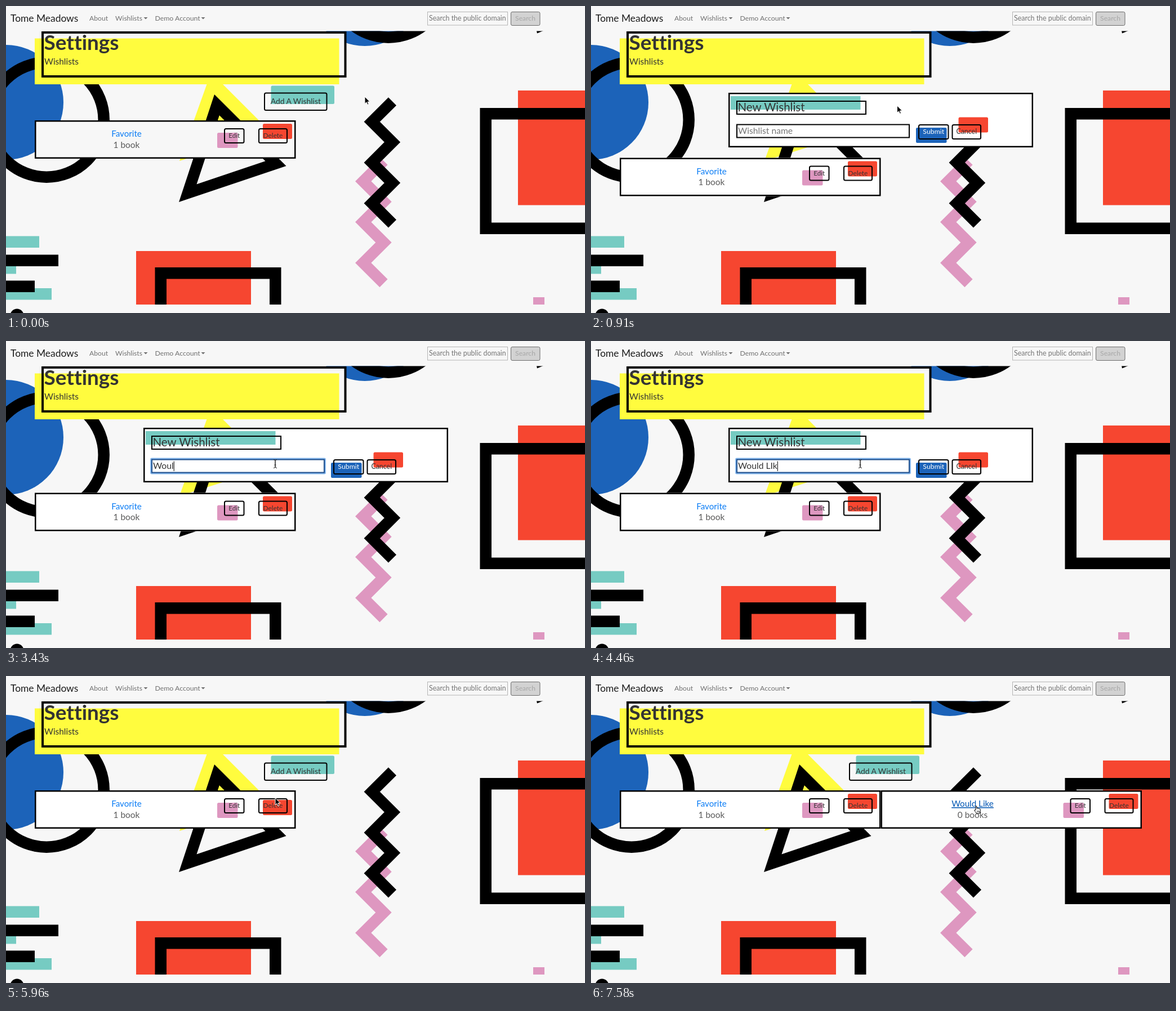
An HTML page that plays this animation: 1028x545 px, repeating every 8000 ms.

```html
<!DOCTYPE html>
<html lang="en">
<head>
<meta charset="utf-8">
<title>Wishlist settings</title>
<style>
  html, body { margin: 0; width: 100%; height: 100%; overflow: hidden; background: #f7f7f7; }
  svg { display: block; width: 100vw; height: 100vh; }
  text { font-family: Lato, "Open Sans", sans-serif; font-variant-ligatures: none; white-space: pre; }
</style>
</head>
<body>
<svg id="stage" viewBox="0 0 1028 545"></svg>
<script>
const LOOP = 8000;
const BG = '#f7f7f7', BLUE = '#1c63b9', YELLOW = '#fffc3e', TEAL = '#76cbc2',
      RED = '#f64630', PINK = '#de97c0', INK = '#333';

// Boxes are given by their outer edges: left, top, right, bottom.
const box = (l, t, r, b, fill, more = '') =>
  `<rect x="${l}" y="${t}" width="${r - l}" height="${b - t}" fill="${fill}" ${more}/>`;
const frame = (l, t, r, b, w, fill = 'none', more = '') =>
  box(l + w / 2, t + w / 2, r - w / 2, b - w / 2, fill, `stroke="#000" stroke-width="${w}" ${more}`);
const label = (str, x, y, size, fill = INK, more = '') =>
  `<text x="${x}" y="${y}" font-size="${size}" fill="${fill}" ${more}>${str}</text>`;
const mid = (str, x, y, size, fill = INK, more = '') =>
  label(str, x, y, size, fill, `text-anchor="middle" ${more}`);
const group = (id, body, more = '') => `<g id="${id}" ${more}>${body}</g>`;

// Outlined button with a flat block shifted behind it.
const button = (str, l, t, r, b, dx, dy, color, size, ink = INK, id = '') =>
  box(l + dx, t + dy, r + dx, b + dy, color, `rx="2.5" ${id && `id="${id}"`}`) +
  frame(l, t, r, b, 2, 'none', 'rx="2.5"') +
  mid(str, (l + r) / 2, (t + b) / 2 + 3.8, size, ink);

const zigzag = (x, y, color) => {
  const pts = Array.from({ length: 7 }, (_, i) => [x - (i % 2) * 36.3, y + i * 36.2]);
  return `<polyline points="${pts.join(' ')}" fill="none" stroke="${color}" stroke-width="20" stroke-miterlimit="9"/>`;
};

const card = (x, name, count, key) =>
  box(x, 203, x + 463.5, 271, '#fff', 'class="paper"') +
  button('Edit', x + 336, 217, x + 372.5, 244, -12, 8, PINK, 11.6) +
  button('Delete', x + 397, 217, x + 449, 244, 8, -8, RED, 11.9, INK, 'block' + key) +
  frame(x, 203, x + 463.5, 271, 2.5) +
  mid(name, x + 163, 232, 15.2, '#0a7cf5', `id="name${key}"`) +
  mid(count, x + 163, 251.5, 15.4, '#5a5a5a');

const scenery = `
  <clipPath id="tri"><path d="M370 157L307 348L497.5 284Z"/></clipPath>
  <clipPath id="page"><rect y="44.5" width="1028" height="485.5"/></clipPath>
  <g clip-path="url(#page)">
    <circle cx="0" cy="171" r="102" fill="${BLUE}"/>
    <circle cx="72" cy="202" r="101.7" fill="none" stroke="#000" stroke-width="20.5"/>
    <circle cx="637" cy="-31" r="102" fill="${BLUE}"/>
    <circle cx="679" cy="-46" r="101.7" fill="none" stroke="#000" stroke-width="20.5"/>
    <path d="M942 44L954 44L943 48.5Z"/>
    <path d="M364 118L308 275L470 224Z" fill="${YELLOW}"/>
    <path d="M370 157L307 348L497.5 284Z" fill="none" stroke="#000" stroke-width="40" clip-path="url(#tri)"/>
    ${zigzag(670.5, 275, PINK)}${zigzag(686, 169.3, '#000')}
    ${box(909, 150, 1113, 353.5, RED)}${frame(841.5, 181, 1065, 405, 20.5)}
    ${box(231, 435, 435, 640, RED)}${frame(264.5, 464, 488.5, 688, 20.5)}
    ${box(0, 408.5, 59, 429, TEAL)}${box(0, 455, 18, 475.5, TEAL)}${box(0, 501, 81, 521.5, TEAL)}
    ${box(0, 441.5, 93, 462, '#000')}${box(0, 487.5, 51, 508, '#000')}
    ${box(936, 517, 956, 540, PINK)}
  </g>
  <circle cx="19.5" cy="549.5" r="12"/>`;

const nav = label('Tome Meadows', 8, 27.5, 17.4, '#1c1c1c') +
  label('About', 148, 26, 12.2, '#707070') +
  label('Wishlists', 194, 26, 12.1, '#707070') +
  label('Demo Account', 264.5, 26, 12.3, '#707070') +
  '<path d="M244.5 20h7l-3.5 3.5zM346.5 20h7l-3.5 3.5z" fill="#707070"/>' +
  box(748.5, 10.5, 890.5, 34, BG, 'stroke="#b5b5b5"') +
  label('Search the public domain', 751, 26, 12.4, '#757575') +
  box(896.5, 10.5, 948, 34.5, '#d2d2d2', 'stroke="#6d6d6d" rx="2.5"') +
  mid('Search', 922, 26, 12.2, '#a6a6a6');

const header = box(64, 46, 604, 126, BG) + box(51, 57.5, 591.5, 139, YELLOW) +
  frame(63, 45, 604.5, 127, 4) +
  label('Settings', 67.5, 78, 36.9, INK, 'font-weight="700"') +
  label('Wishlists', 68, 104, 15.4);

const add = group('addIdle', button('Add A Wishlist', 458, 153.5, 570.5, 186, 12.5, -12, TEAL, 13.9)) +
  group('addHover',
    box(454, 149, 565, 180, YELLOW, 'opacity=".5" rx="2" style="filter:blur(1.5px)"') +
    box(459, 154.5, 569.5, 185, '#89a9d8', 'rx="2"') + box(459, 154.5, 564, 180, BLUE) +
    frame(458, 153.5, 570.5, 186, 2, 'none', 'rx="2.5"') +
    mid('Add A Wishlist', 514.25, 173.6, 13.9, '#fff'));

const form = frame(244, 154, 785, 251, 2.5, '#fff') +
  box(248, 160, 478.5, 184, TEAL) + frame(258, 168, 489, 193, 2) +
  label('New Wishlist', 260.5, 187, 20.5) +
  group('ring', box(257.5, 209, 566.5, 235, 'none', 'stroke="#86b7ec" stroke-width="3" rx="1.5"')) +
  box(259, 210.5, 565, 233.5, '#fff', 'id="field" stroke="#000" stroke-width="2"') +
  label('Wishlist name', 261, 227, 15.7, '#757575', 'id="hint"') +
  label('', 261, 227, 15.7, INK, 'id="typed"') +
  box(261, 213.5, 262, 231, '#000', 'id="caret"') +
  button('Submit', 581, 210, 635.5, 237, -4, 6, BLUE, 12.3, '#fff') +
  button('Cancel', 640.5, 210, 693, 237, 12, -12.5, RED, 12.4);

const cursors = group('arrow', '<path d="M0 0V12.5L3 9.8L5 14.3L7 13.4L5.1 9H9Z" stroke="#fff"/>') +
  group('beam', '<path d="M-3 -7.5Q0 -7.5 0 -5V5Q0 7.5 -3 7.5M3 -7.5Q0 -7.5 0 -5V5Q0 7.5 3 7.5M-1.5 2H1.5" fill="none" stroke="#222"/>') +
  group('hand', '<path d="M3 8V1.5Q4 0 5 1.5V5Q6.5 4 7.3 5.5Q8.8 4.7 9.5 6Q11.5 5.5 11.5 7.5Q11.5 10 10 14H4.5Q3.5 12 .8 9Q.5 6.8 3 8Z" fill="#fff" stroke="#000"/><path d="M5.8 9v3M7.6 9v3M9.3 9v3" stroke="#000" stroke-width=".7"/>');

document.getElementById('stage').innerHTML = scenery + nav + header + group('add', add) +
  group('list', card(51, 'Favorite', '1 book', 'A') + group('second', card(514.5, 'Would Like', '0 books', 'B'))) +
  group('form', form) + cursors;

const ui = {};
document.querySelectorAll('#stage [id]').forEach(e => ui[e.id] = e);
const papers = document.querySelectorAll('.paper');

// Step tables: start time, then the values held until the next row.
const pointer = [
  [0, 'arrow', 637, 161], [290, 'arrow', 631, 163], [450, 'arrow', 604, 169],
  [610, 'arrow', 573, 174], [760, 'arrow', 543.5, 177], [1060, 'arrow', 532, 190],
  [1210, 'beam', 494, 219], [1350, 'beam', 478, 218], [5810, 'arrow', 478, 216.5],
  [6250, 'arrow', 482, 228], [6400, 'arrow', 498, 252], [6550, 'arrow', 527, 282],
  [6690, 'arrow', 553, 306], [6840, 'arrow', 566, 314], [7140, 'arrow', 590, 304],
  [7290, 'arrow', 632, 276], [7430, 'arrow', 668, 247], [7580, 'hand', 680, 230]
];
const typing = [
  [0, ''], [2990, 'W'], [3140, 'Wo'], [3280, 'Wou'], [3430, 'Woul'], [3570, 'Would'],
  [3720, 'Would L'], [3870, 'Would LI'], [4010, 'Would LIk'], [4160, 'Would LIke'],
  [4460, 'Would LIk'], [4610, 'Would LI'], [4760, 'Would L'],
  [5060, 'Would Lik'], [5210, 'Would Like']
];
const blink = [[0, false], [1500, true], [2250, false], [2700, true]];
const deleteTop = [[0, 209], [5810, 213], [5960, 220], [6100, 225], [6250, 217], [6400, 209]];

const at = (table, t) => table.findLast(row => row[0] <= t).slice(1);
const show = (el, on) => el.setAttribute('display', on ? 'inline' : 'none');

function draw(t) {
  const open = t >= 910 && t < 5810;
  const hover = t >= 760 && t < 910;
  const focus = t >= 1500;
  const linked = t >= 7580;

  show(ui.form, open);
  show(ui.add, !open);
  show(ui.addIdle, !hover);
  show(ui.addHover, hover);
  show(ui.second, t >= 6100);
  ui.list.setAttribute('transform', `translate(0 ${open ? 66.5 : 0})`);
  papers.forEach(p => p.setAttribute('fill', t < 910 ? BG : '#fff'));

  const [str] = at(typing, t);
  if (ui.typed.textContent !== str) ui.typed.textContent = str;
  show(ui.hint, !str);
  show(ui.ring, focus);
  ui.field.setAttribute('stroke', focus ? '#1f4f8c' : '#000');
  show(ui.caret, at(blink, t)[0]);
  ui.caret.setAttribute('x', 261 + (open && str ? ui.typed.getComputedTextLength() : 0));

  ui.blockA.setAttribute('y', at(deleteTop, t)[0]);
  ui.nameB.setAttribute('fill', linked ? '#0056b3' : '#0a7cf5');
  ui.nameB.setAttribute('text-decoration', linked ? 'underline' : 'none');

  const [kind, x, y] = at(pointer, t);
  for (const k of ['arrow', 'beam', 'hand']) show(ui[k], k === kind);
  ui[kind].setAttribute('transform', `translate(${x} ${y})`);
}

const start = performance.now();
function tick(now) {
  draw(Math.max(0, now - start) % LOOP);
  requestAnimationFrame(tick);
}
draw(0);
requestAnimationFrame(tick);
</script>
</body>
</html>
```
